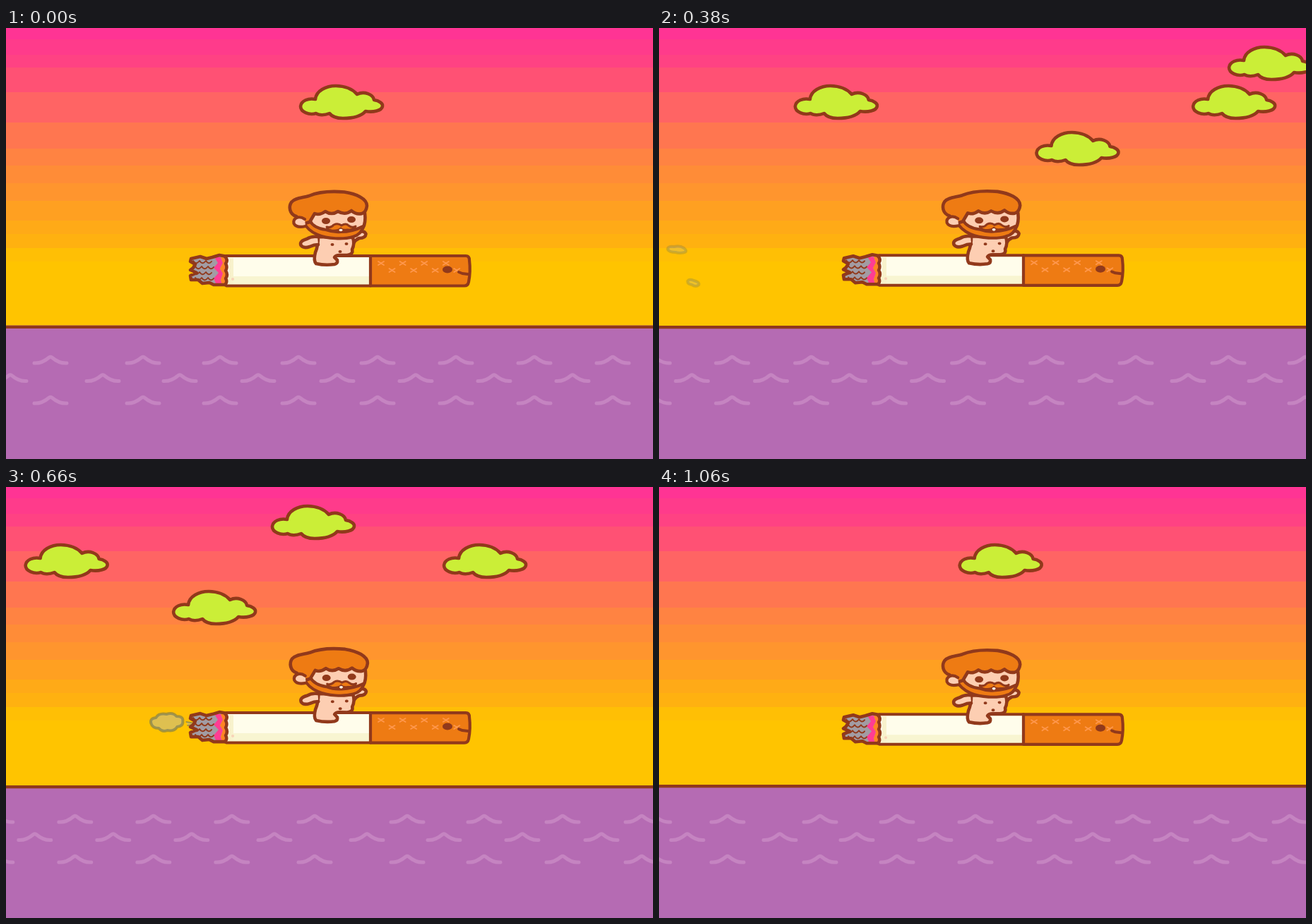
Write an HTML page with a canvas that moves like this. It is 916 px wide and 611 px high and loops after 1080 ms.

```html
<!DOCTYPE html>
<html lang="en">
<head>
<meta charset="utf-8">
<title>Sunset ride</title>
<style>
html, body { margin: 0; width: 100%; height: 100%; overflow: hidden; background: #ffc400; }
canvas { display: block; width: 916px; height: 611px; }
</style>
</head>
<body>
<canvas id="stage" width="916" height="611"></canvas>
<script>
const ctx = document.getElementById('stage').getContext('2d');
const W = 916, H = 611, LOOP = 1080, STEP = 20;
const BROWN = '#91391b', ORANGE = '#ee7b13', SKIN = '#fdceb2', LIME = '#cbee37';

// [bottom edge, colour]
const SKY = [
  [16, '#ff3494'], [38, '#ff3b8b'], [56, '#ff4283'], [91, '#ff5174'], [134, '#ff6464'],
  [171, '#ff7650'], [195, '#ff8342'], [220, '#ff8c37'], [245, '#ff952e'], [273, '#ffa021'],
  [292, '#ffaa17'], [312, '#ffb110'], [331, '#ffbf05'], [440, '#ffc400']
];

const path = d => new Path2D(d);

const CLOUD = path('M2 31C3 23 13 19 23 21C24 9 38 2 52 2C65 2 76 7 82 14C92 9 105 14 106 22C113 23 119 27 118 31C117 37 105 40 94 38C88 45 76 48 62 48C52 48 46 45 43 41C36 44 28 44 24 41C14 44 2 39 2 31Z');
const WAVE = path('M-23 4C-16 4.5 -9 2 -2 -4Q0 -5.5 2 -4C9 2 16 4.5 23 4');

const ASH = path('M313 324L302 322L292 325L284 327L275 324L262 327L261 331L268 335L265 340L261 343L270 347L261 351L262 357L272 357L278 362L288 361L294 364L313 364Z');
const FILTER = path('M516 323H651Q656 323 656 329Q658 345 655 360Q654 365.5 649 365.5H516Z');
const GLOW = path('M295 325L300 333L294 340L301 347L294 355L298 364H306L304 357L307 348L303 341L307 333L304 325Z');
const EMBER = path('M304 325L307 333L303 341L307 348L304 357L306 364H311V325Z');
const BURN = path('M310 324Q315 329 311 334Q314 339 311 344Q315 350 311 355Q314 360 310 364');

const HAIR = path('M411 267C401 264 400 253 404 247C409 241 419 241 429 238C443 232 461 231 479 232.5C496 235 511 242 511 252Q510 261 504 263Q496 265 489 259Q480 266 470 260Q461 266 452 260Q444 266 437 263L430 275L420 278Z');
const FACE = path('M432 257H507Q510 270 507 280C503 291 489 297 468 297C445 296 431 286 428 274Z');
const BEARD = path('M422 276L430 273Q436 284 453 286Q464 290 474 289Q490 289 506 281Q503 293 491 296C478 300 455 299 441 293Q427 287 422 276Z');
const EAR = path('M423 271C414 265 406 270 407.5 277Q411 284 424 281');
const MUSTACHE = path('M454 282Q460 284 464 279Q470 276 475 280Q481 276 485 280Q490 284 495 281Q493 287 483 286Q476 287 474 284Q470 288 461 287Q455 286 454 282Z');
const LEFT_ARM = path('M441 296Q432 295 426 299Q415 302 417.5 308Q421 313 430 310Q436 307 442 307');
const RIGHT_ARM = path('M489 300Q488 292 498 290Q507 286 509.5 292Q509 298 500 298Q495 300 492 305');
const BODY = path('M442 296Q442 309 438 318Q435 330 439 334Q452 337 465 335Q470 334 469 329L465 325Q467 322 472 322H483Q492 321 490 314Q494 306 491 297Z');

const ARC = path('M-24 3C-26 -6 -14 -7 -8 -8C4 -11 24 -6 24 3C22 9 12 7 8 3C4 0 -4 0 -9 5C-15 9 -23 9 -24 3Z');
const NUB = path('M-9 2Q-10 -3 -3 -3Q0 -8 5 -5Q11 -4 9 2Q4 3 1 6Q-6 7 -9 2Z');
const HEART = path('M-15 -1Q-14 -6 -6 -4Q-1 -2 3 -4Q11 -8 15 -3Q16 2 8 3Q4 8 -3 7Q-7 6 -7 3Q-13 3 -15 -1Z');
const PUFF = path('M-22 1Q-24 -6 -15 -7Q-11 -14 0 -12Q9 -15 14 -9Q24 -9 23 -2Q24 5 15 6Q11 13 1 11Q-6 14 -11 8Q-20 8 -22 1Z');
const SPECK = path('M-13 0Q-14 -5 -4 -4Q4 -6 10 -2Q15 2 11 4Q4 6 -2 4Q-11 4 -13 0Z');
const SEED = path('M-8 -2Q-6 -6 1 -3Q9 -1 8 3Q4 7 -2 3Q-8 2 -8 -2Z');
const DASH = path('M-9 -3L8 0L-7 2');

// [shape, x, y, start, end, fade]
const SMOKE = [
  [DASH, 240, 336, 50, 210, 40],
  [PUFF, 203, 334, 80, 235, 60],
  [ARC, 136, 326, 140, 310, 70],
  [NUB, 112, 345, 140, 310, 70],
  [HEART, 149, 349, 140, 310, 70],
  [SPECK, 74, 314, 220, 430, 100],
  [SEED, 97, 361, 220, 430, 100]
];

const GAPS = [0, 131, 240, 351, 463, 574, 685, 796];

function shape(p, fill, width = 4.6, stroke = BROWN) {
  if (fill) { ctx.fillStyle = fill; ctx.fill(p); }
  if (width) { ctx.strokeStyle = stroke; ctx.lineWidth = width; ctx.stroke(p); }
}

function at(x, y, draw) {
  ctx.save();
  ctx.translate(x, y);
  draw();
  ctx.restore();
}

function box(x, y, w, h, fill) {
  ctx.fillStyle = fill;
  ctx.fillRect(x, y, w, h);
}

function dot(x, y, rx, ry, fill = BROWN) {
  ctx.fillStyle = fill;
  ctx.beginPath();
  ctx.ellipse(x, y, rx, ry, 0, 0, Math.PI * 2);
  ctx.fill();
}

function lift(t) {
  const p = t / 360 % 1;
  const tri = 1 - Math.abs(2 * p - 1);
  const sine = (1 - Math.cos(p * Math.PI * 2)) / 2;
  return (tri + sine) / 2;
}

function sky() {
  let top = 0;
  for (const [bottom, colour] of SKY) {
    box(0, top, W, bottom - top, colour);
    top = bottom;
  }
}

function sea(t, k) {
  const y = 421.7 + 4.4 * k;
  box(0, y, W, H - y, '#b56bb3');
  box(0, y, W, 4.3, BROWN);
  for (const start of [63 - 0.817 * t, 998 - 0.85 * t]) {
    for (const gap of GAPS) {
      for (const [dx, row] of [[0, 471], [-57, 496.5], [0, 528]]) {
        at(start + gap + dx, row, () => shape(WAVE, null, 5, '#c584c1'));
      }
    }
  }
}

function clouds(t) {
  const list = [
    [415 - 0.59 * t, 80], [938.8 - 0.486 * t, 80],
    [936 - 1.062 * t, 146], [1388.7 - 1.536 * t, 25]
  ];
  for (const [x, y] of list) at(x, y, () => shape(CLOUD, LIME));
}

function smoke(t) {
  for (const begin of [0, 580]) {
    const s = t - begin;
    for (const [p, x, y, start, end, fade] of SMOKE) {
      if (s < start || s >= end) continue;
      ctx.globalAlpha = 0.55 * Math.min(1, (end - s) / fade);
      at(x - 0.243 * (s - 180), y, () => shape(p, '#c4bd92', p === DASH ? 2 : 4, '#64705a'));
    }
  }
  ctx.globalAlpha = 1;
}

function cigarette() {
  shape(ASH, '#a29ca3', 0);
  shape(GLOW, '#ff3d93', 0);
  shape(EMBER, '#ff8424', 0);
  ctx.strokeStyle = BROWN;
  ctx.lineWidth = 2;
  ctx.beginPath();
  for (let row = 0; row < 4; row++) {
    for (let col = 0; col < 3; col++) {
      const x = 269 + col * 9 + (row % 2) * 3, y = 331 + row * 8;
      ctx.moveTo(x - 4, y - 1);
      ctx.quadraticCurveTo(x, y + 5, x + 4, y);
    }
  }
  ctx.stroke();
  shape(ASH);

  box(313, 323, 203, 42, '#fffdeb');
  box(313, 352, 203, 13, '#f8f5d1');
  box(316, 326, 6, 37, '#f8f2cc');
  dot(321, 356, 2, 2, '#f8d3b8');
  shape(path('M312 323H516M312 365.5H516'), null, 4);
  shape(BURN, null, 4.5);

  shape(FILTER, ORANGE, 4.2);
  ctx.strokeStyle = '#ff974c';
  ctx.lineWidth = 1.8;
  ctx.beginPath();
  for (let i = 0; i < 8; i++) {
    const x = 531 + (i >> 1) * 30.6 + (i % 2) * 15.5, y = 333.5 + (i % 2) * 10;
    ctx.moveTo(x - 4, y - 2.5);
    ctx.lineTo(x + 4, y + 2.5);
    ctx.moveTo(x + 4, y - 2.5);
    ctx.lineTo(x - 4, y + 2.5);
  }
  ctx.stroke();
  dot(625, 342.5, 7, 5);
  shape(path('M641 346L646 348L654 349'), null, 4);
}

function rider(k) {
  ctx.save();
  ctx.translate(452, 332);
  ctx.rotate(0.04 * k);
  ctx.translate(-452, -332);
  shape(RIGHT_ARM, SKIN);
  shape(BODY, SKIN);
  shape(LEFT_ARM, SKIN);
  dot(462, 307, 2.5, 2);
  dot(482, 306, 2.5, 2);
  dot(473, 317, 2.5, 2);
  shape(FACE, SKIN);
  shape(BEARD, ORANGE, 4.2);
  shape(HAIR, ORANGE);
  shape(EAR, SKIN, 4.2);
  shape(MUSTACHE, ORANGE, 3);
  dot(474, 286.5, 2.5, 1.8, '#fff3e6');
  dot(453, 273.5, 6, 4.5);
  dot(489, 271.5, 6, 4.5);
  ctx.restore();
}

function draw(t) {
  const k = lift(t);
  ctx.lineCap = ctx.lineJoin = 'round';
  sky();
  clouds(t);
  sea(t, k);
  smoke(t);
  at(0, -10 * k, () => {
    cigarette();
    rider(k);
  });
}

const begun = performance.now();
function tick() {
  const t = (performance.now() - begun) % LOOP;
  draw(Math.floor(t / STEP) * STEP);
  requestAnimationFrame(tick);
}
tick();
</script>
</body>
</html>
```
